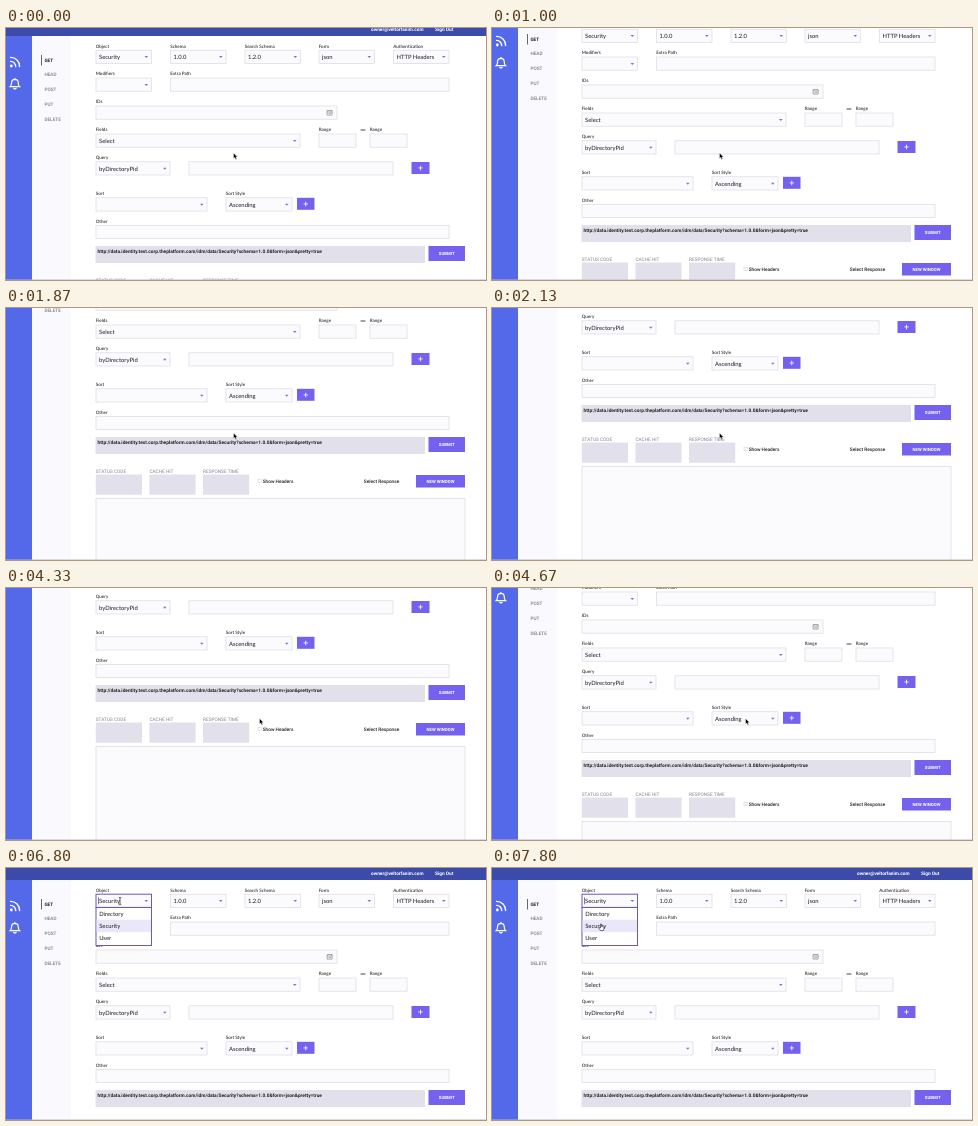
These frames come from a looping animation (480 by 252 pixels, 8000 ms). An HTML page:

```html
<!DOCTYPE html>
<html lang="en">
<head>
<meta charset="utf-8">
<title>Query form</title>
<style>
  html, body { margin: 0; width: 100%; height: 100%; overflow: hidden; background: #fff; }
  svg { display: block; width: 100vw; height: 100vh; }
  text { font-family: Roboto, sans-serif; font-size: 4.75px; font-weight: 500; fill: #222; text-rendering: geometricPrecision; }
  .label { font: 500 4.55px Lato, sans-serif; }
  .value { font: 500 5.85px Lato, sans-serif; fill: #2b2b36; }
  .menu { font-size: 4.7px; fill: #7c7c84; }
  .strong { font-weight: 700; fill: #222; }
  .url { font-size: 4.8px; font-weight: 600; }
  .note { font-weight: 400; fill: #85858d; }
  .light { fill: #fff; font-weight: 600; }
  .caps { fill: #fff; font-weight: 700; font-size: 4.3px; text-anchor: middle; }
  .plus { fill: #fff; font-size: 9px; font-weight: 400; text-anchor: middle; }
</style>
</head>
<body>
<svg viewBox="0 0 480 252">
  <g id="page"></g>
  <rect y="251.5" width="480" height=".5" fill="#b8b8c4"/>
  <g id="pointer">
    <path id="arrow" d="M0 0V5.6L1.3 4.5L2.2 6.5L3.2 6L2.3 4.1H4Z" fill="#000" stroke="#fff" stroke-width=".4"/>
    <path id="beam" d="M-1.3-3.6Q0-3.6 0-2.6Q0-3.6 1.3-3.6M0-2.6V2.8M-1.3 3.8Q0 3.8 0 2.8Q0 3.8 1.3 3.8" fill="none" stroke="#222" stroke-width=".7"/>
    <path id="hand" d="M-.6-1.6Q0-2.4.6-1.6V.5L2.6 1Q3.2 1.3 3 2.2L2.4 4.5H-.6L-2.2 2.2Q-2.2 1.2-.6 2Z" fill="#fff" stroke="#111" stroke-width=".6"/>
  </g>
</svg>
<script>
const $ = id => document.getElementById(id);
const page = $("page");
const borderColor = "#dad9e6", focusColor = "#635bbd";

function add(tag, attrs, parent = page) {
  const el = document.createElementNS("http://www.w3.org/2000/svg", tag);
  for (const name in attrs) el.setAttribute(name, attrs[name]);
  return parent.appendChild(el);
}
const rect = (x, y, width, height, fill, parent) => add("rect", { x, y, width, height, fill }, parent);
const stroke = (d, color, width) =>
  add("path", { d, fill: "none", stroke: color, "stroke-width": width, "stroke-linecap": "round" });

// y is the middle of the capitals
function text(x, y, string, kind = "", parent) {
  const el = add("text", { x, class: kind }, parent);
  el.textContent = string;
  el.setAttribute("y", y + parseFloat(getComputedStyle(el).fontSize) * 0.36);
  return el;
}
function box(x, y, w, h = 13.2) {
  const el = rect(x, y, w, h, "#fbfbfd");
  el.setAttribute("stroke", borderColor);
  el.setAttribute("stroke-width", 0.7);
  return el;
}
function input(x, y, w, label) {
  if (label) text(x - 0.3, y - 4.2, label, "label");
  return box(x, y, w);
}
function select(x, y, w, label, value = "") {
  const frame = input(x, y, w, label);
  text(x + 3, y + 6.6, value, "value");
  add("path", { d: `M${x + w - 7} ${y + 5.9}h3.6l-1.8 2z`, fill: "#7775d2" });
  return frame;
}
function button(x, y, w, h, caption, kind = "caps") {
  rect(x, y, w, h, "#7461ee");
  text(x + w / 2, y + h / 2, caption, kind);
}

// Frame of the page
rect(0, 0, 26, 420, "#5468ea");
rect(26, 0, 39, 420, "#faf9fe");
rect(0, 0, 480, 12, "#3c4ba9");
text(365, 5, "owner@veltorfanim.com", "light");
text(429, 5, "Sign Out", "light");
rect(35, 31, 0.8, 10.5, "#444");
["GET", "HEAD", "POST", "PUT", "DELETE"].forEach((name, i) =>
  text(38.4, 36 + i * 14.75, name, i ? "menu" : "menu strong"));

// Feed and bell icons
add("circle", { cx: 5.3, cy: 42, r: 1.4, fill: "#fff" });
stroke("M4.6 37.4A5 5 0 0 1 9.7 42.6M4.6 33.4A9 9 0 0 1 13.6 42.6", "#fff", 1.4);
stroke("M4.2 62.6Q5.6 61.4 5.6 58.6Q5.6 55.5 8.9 55.3Q12.2 55.5 12.2 58.6Q12.2 61.4 13.6 62.6ZM8.9 54.4V55M7.7 64.3Q8.9 65.6 10.1 64.3", "#fff", 1.2);

// Form
const objectBox = select(90, 26.2, 55.5, "Object", "Security");
select(164.5, 26.2, 55.5, "Schema", "1.0.0");
select(239, 26.2, 55.5, "Search Schema", "1.2.0");
select(313, 26.2, 55.5, "Form", "json");
select(387.5, 26.2, 55.5, "Authentication", "HTTP Headers");
select(90, 54, 55.5, "Modifiers");
input(164.5, 54, 278.5, "Extra Path");
input(90, 82, 241, "IDs");
stroke("M321.5 86.5h4.6v4.6h-4.6zM321.5 88h4.6M323 89.6h1.6", "#888", 0.7);
select(90, 110, 204, "Fields", "Select");
input(313, 110, 37, "Range");
input(364, 110, 37, "Range");
stroke("M355 106H359", "#333", 0.9);
select(90, 137.8, 74, "Query", "byDirectoryPid");
input(183, 137.8, 204);
button(405.5, 138, 18, 12, "+", "plus");
select(90, 173.8, 111, "Sort");
select(220, 173.8, 66, "Sort Style", "Ascending");
button(291, 173.8, 17.5, 12, "+", "plus");
input(90, 201.3, 353, "Other");

// Request and response
rect(89.5, 222, 329.5, 17, "#e2e1eb");
text(91.5, 227.4, "http://data.identity.test.corp.theplatform.com/idm/data/Security?schema=1.0.0&form=json&pretty=true", "url");
button(422.5, 222, 36.5, 15, "SUBMIT");
["STATUS CODE", "CACHE HIT", "RESPONSE TIME"].forEach((name, i) => {
  const x = 89.8 + i * 53.6;
  text(x, 256, name, "note");
  rect(x, 259.5, 46.2, 20.3, "#e2e1eb");
});
box(252, 264.2, 3.4, 3.4);
text(256.7, 266, "Show Headers");
text(357.8, 266, "Select Response");
button(410, 260, 49, 12.5, "NEW WINDOW");
box(90, 283.5, 369, 140);

// Drop-down list
const caret = rect(92.3, 29.3, 0.6, 7, "#333");
const list = add("g", {});
const panel = rect(90, 39.5, 55.5, 38, "#fff", list);
panel.setAttribute("stroke", focusColor);
const highlight = rect(90.6, 0, 54.3, 12.4, "#e9e7f8", list);
["Directory", "Security", "User"].forEach((name, i) =>
  text(93.2, 45.4 + i * 12.4, name, "value", list));

// Keys are [tick, values...] with 15 ticks per second
const scrollKeys = [[0, 4], [1, 11], [2, 17], [3, 21], [9, 21], [15, 25], [16, 38], [17, 56], [18, 73],
  [19, 86], [20, 92], [27, 92], [28, 93], [29, 103], [30, 115], [31, 122], [32, 125], [66, 125],
  [67, 122], [68, 110], [69, 84], [70, 50], [71, 0]];
const pointerKeys = [[0, 227.5, 125], [49, 227.5, 125], [59, 253.5, 130.5], [80, 253.5, 130.5],
  [89, 109, 33], [96, 109, 33], [98, 114, 33], [106, 114, 33], [117, 109, 58]];
const linear = u => u;
const smooth = u => u * u * (3 - 2 * u);

function sample(keys, tick, ease) {
  const next = keys.findIndex(key => key[0] > tick);
  if (next < 0) return keys[keys.length - 1].slice(1);
  const a = keys[next - 1], b = keys[next];
  const u = ease((tick - a[0]) / (b[0] - a[0]));
  return a.slice(1).map((v, i) => v + (b[i + 1] - v) * u);
}
const show = (el, on) => el.setAttribute("visibility", on ? "visible" : "hidden");

function draw(ms) {
  const tick = Math.floor((ms % 8000 + 4) * 15 / 1000) % 120;
  const [scroll] = sample(scrollKeys, tick, linear);
  const [x, y] = sample(pointerKeys, tick, smooth);
  const focused = tick >= 97, open = tick >= 102;
  page.setAttribute("transform", `translate(0 ${-scroll})`);
  $("pointer").setAttribute("transform", `translate(${x} ${y})`);
  show($("beam"), focused && y < 40);
  show($("hand"), focused && y >= 40);
  show($("arrow"), !focused);
  objectBox.setAttribute("stroke", focused ? focusColor : borderColor);
  objectBox.setAttribute("stroke-width", focused ? 1 : 0.7);
  show(caret, focused);
  show(list, open);
  highlight.setAttribute("y", y > 40 && y < 52 ? 40 : 51.7);
}

const start = performance.now();
function frame() {
  draw(performance.now() - start);
  requestAnimationFrame(frame);
}
frame();
</script>
</body>
</html>
```
